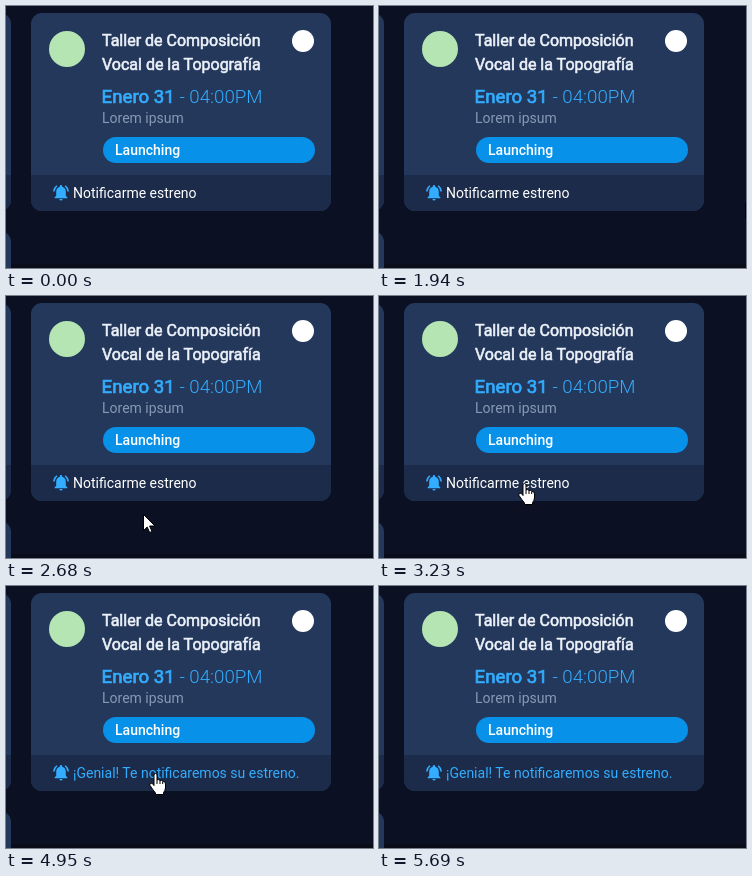
Recreate the animation shown at these times as an HTML page. Size 367 px wide and 262 px high, loop 7020 ms.

```html
<!DOCTYPE html>
<html lang="es">
<head>
<meta charset="utf-8">
<title>Notificarme estreno</title>
<style>
  html, body { margin: 0; width: 100%; height: 100%; overflow: hidden; background: #0b1122; }
  svg { display: block; width: 367px; height: 262px; font: 14px Roboto, sans-serif; }
  .title { font-size: 16px; fill: #eef3fb; stroke: #eef3fb; stroke-width: .6px; }
  .date { font-size: 18.72px; font-weight: 300; fill: #33adff; }
  .strong { font-weight: 400; stroke: #33adff; stroke-width: .7px; }
  .cursor { fill: #fff; stroke: #000; }
</style>
</head>
<body>
<svg viewBox="0 0 367 262">
  <defs>
    <clipPath id="round"><rect width="300" height="198" rx="11"/></clipPath>
    <g id="card" clip-path="url(#round)">
      <rect width="300" height="198" fill="#24385b"/>
      <rect y="162" width="300" height="36" fill="#1c2b4a"/>
    </g>
  </defs>
  <rect width="367" height="262" fill="#0b1122"/>
  <rect y="258" width="367" height="4" fill="#090d19"/>
  <use href="#card" x="-295" y="7"/>
  <use href="#card" x="-295" y="225"/>
  <use href="#card" x="25" y="7"/>

  <circle cx="61" cy="43" r="18" fill="#b5e5b3"/>
  <circle cx="297" cy="35" r="11" fill="#fff"/>
  <g class="title">
    <text x="96" y="40">Taller de Composición</text>
    <text x="96" y="64">Vocal de la Topografía</text>
  </g>
  <text class="date" x="95.5" y="97"><tspan class="strong">Enero 31</tspan> - 04:00PM</text>
  <text x="96" y="117" fill="#8799b5">Lorem ipsum</text>
  <rect x="97" y="131" width="212" height="26" rx="13" fill="#0791e9"/>
  <text x="109" y="149" fill="#fff" font-weight="500">Launching</text>

  <path transform="translate(45.4 177) scale(.8)" fill="#33adff" d="M7.6 4.1 6.2 2.7A10.5 10.5 0 0 0 2 10.5h2A8.5 8.5 0 0 1 7.6 4.1ZM20 10.5h2a10.5 10.5 0 0 0-4.1-7.8l-1.4 1.4A8.5 8.5 0 0 1 20 10.5ZM18 11c0-3.1-1.6-5.6-4.5-6.3V4a1.5 1.5 0 0 0-3 0v.7C7.6 5.4 6 7.9 6 11v5l-2 2v1h16v-1l-2-2ZM10 20a2 2 0 0 0 4 0Z"/>
  <text id="label" x="67" y="192"></text>

  <path id="arrow" class="cursor" d="M.5.5V16.5L4.2 13 6.7 18.5 9 17.5 6.6 12H12Z"/>
  <g id="hand" class="cursor">
    <path d="M-1 2Q-1 .5.5.5T2 2V7Q3.5 6 5 7.5 6.5 6.8 7.7 8.4 10.5 8 10.5 11V15Q10 18 8.5 19.5V21.5H.5V20Q-2 17-5 12.5-5.8 10.2-4 10-2.5 10-1 12.5Z"/>
    <path d="M2 7v4M5 8v3M7.7 9v2" fill="none"/>
  </g>
</svg>
<script>
const LOOP = 7020, CLICK = 3940, FADE = 110;
const [label, arrow, hand] = ['label', 'arrow', 'hand'].map(id => document.getElementById(id));

// Each stroke of the pointer: [ms, x, y]; hidden outside its time span.
const strokes = [
  [[20, 356, 258], [120, 356, 258]],
  [[1940, 366, 196], [2030, 366, 196], [2200, 302, 215], [2350, 225, 226], [2500, 165, 224],
   [2640, 140, 218], [2680, 137, 218], [2850, 134, 207], [2960, 137, 199], [3230, 145, 187],
   [4930, 145, 187], [4950, 149, 187], [5080, 157, 192], [5200, 175, 206], [5330, 204, 225],
   [5430, 237, 235], [5550, 302, 243], [5650, 358, 247], [5690, 370, 249]]
];

function pointerAt(t) {
  const points = strokes.find(s => t >= s[0][0] && t < s.at(-1)[0]);
  if (!points) return null;
  const i = points.findIndex(p => p[0] > t);
  const [t0, x0, y0] = points[i - 1], [t1, x1, y1] = points[i];
  const k = (t - t0) / (t1 - t0);
  return { x: Math.round(x0 + (x1 - x0) * k), y: Math.round(y0 + (y1 - y0) * k) };
}

function show(cursor, pos) {
  cursor.style.display = pos ? '' : 'none';
  if (pos) cursor.setAttribute('transform', `translate(${pos.x} ${pos.y})`);
}

function draw(t) {
  const k = Math.min(1, Math.max(0, (t - CLICK) / FADE));
  label.textContent = t < CLICK ? 'Notificarme estreno' : '¡Genial! Te notificaremos su estreno.';
  label.setAttribute('fill', `rgb(${255 - 204 * k}, ${255 - 82 * k}, 255)`);
  const pos = pointerAt(t);
  const overCard = pos && pos.x < 325 && pos.y < 205;
  show(hand, overCard ? pos : null);
  show(arrow, overCard ? null : pos);
}

const start = performance.now();
function tick() {
  draw((performance.now() - start) % LOOP);
  requestAnimationFrame(tick);
}
tick();
</script>
</body>
</html>
```
